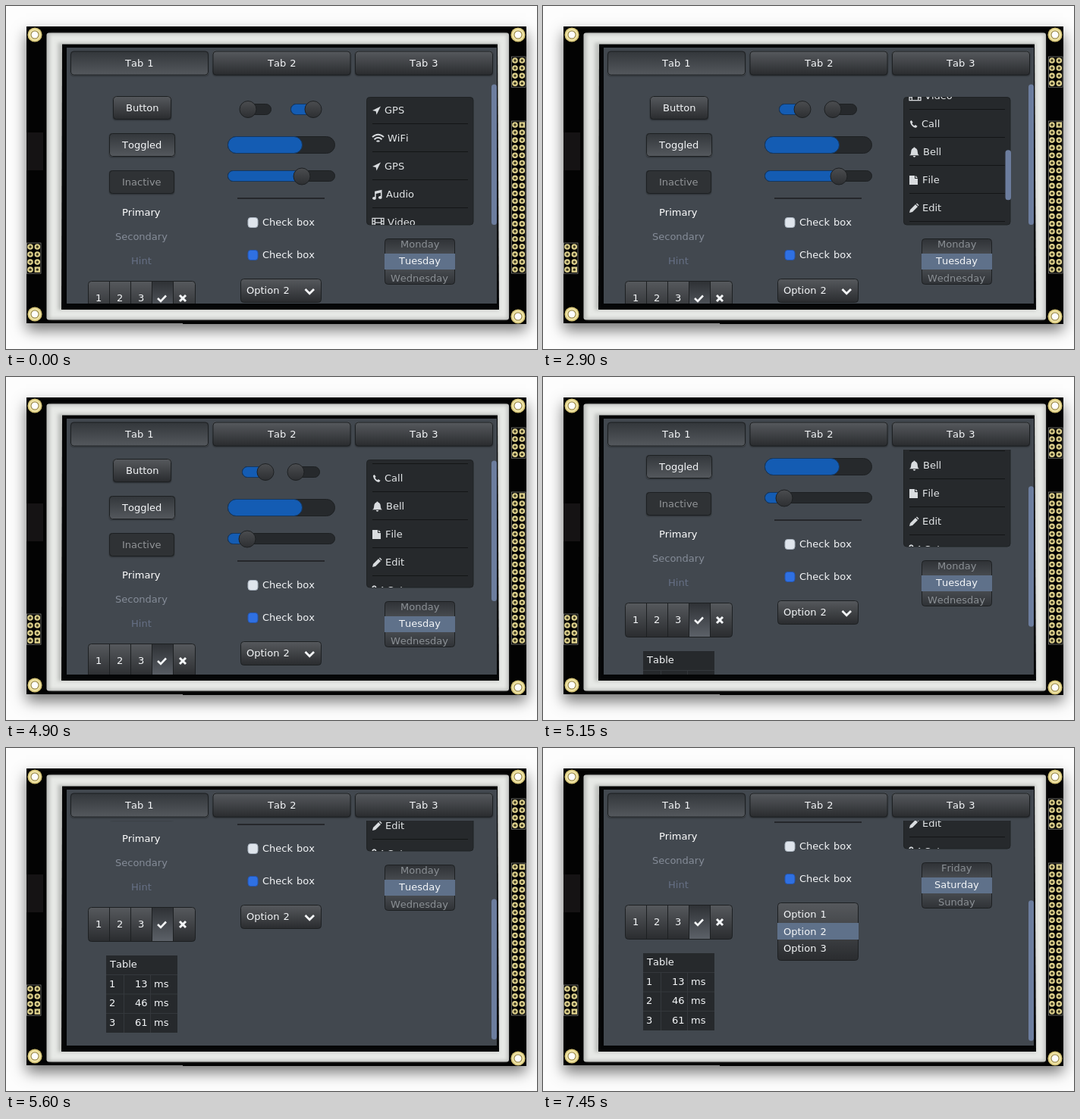
These frames come from a looping animation (700x453 px, 8000 ms). An HTML page with a canvas:

```html
<!DOCTYPE html>
<html lang="en">
<head>
<meta charset="utf-8">
<title>Display board demo</title>
<style>
html, body { margin: 0; width: 100%; height: 100%; overflow: hidden; background: #fdfdfd; }
canvas { display: block; }
</style>
</head>
<body>
<canvas id="stage" width="700" height="453"></canvas>
<script>
const c = document.getElementById('stage').getContext('2d');
const LOOP = 8000, STEP = 50;
const BLUE = '#145cb3', DARK = '#26292c', EDGE = '#1d2022', BAND = '#5f718a', THUMB = '#6c7d9e';
const RAISED = ['#56595d', '#2a2c2f'], SUNKEN = ['#33373b', '#54585d'];
const WHITE = '#f4f6f8', GREY = '#8b9095';

// Piecewise linear tracks: [time, value, time, value, ...]
const tracks = {
  switchA: [50, 319, 350, 342],
  switchB: [1100, 405, 1350, 382],
  list: [2100, 0, 2500, 90, 2800, 156, 2900, 167, 2950, 170, 3050, 175, 3200, 178],
  slider: [3850, 390, 4400, 318],
  page: [4850, 0, 4900, 11, 5400, 118, 5450, 129, 5500, 138, 5550, 147, 5600, 153, 5650, 156],
  roller: [6050, 0, 6250, 60, 6350, 80.5, 6450, 84, 6600, 84, 6850, 90],
  menu: [7300, 31, 7350, 54, 7450, 76]
};

function at(name, t) {
  const k = tracks[name];
  if (t <= k[0]) return k[1];
  for (let i = 2; i < k.length; i += 2) {
    if (t <= k[i]) return k[i - 1] + (k[i + 1] - k[i - 1]) * (t - k[i - 2]) / (k[i] - k[i - 2]);
  }
  return k[k.length - 1];
}

function gradient(y, h, colors) {
  const g = c.createLinearGradient(0, y, 0, y + h);
  colors.forEach((color, i) => g.addColorStop(i / (colors.length - 1), color));
  return g;
}

function box(x, y, w, h, r, fill, stroke) {
  c.beginPath();
  c.roundRect(x, y, w, h, r);
  c.fillStyle = Array.isArray(fill) ? gradient(y, h, fill) : fill;
  c.fill();
  if (stroke) {
    c.strokeStyle = stroke;
    c.lineWidth = 1;
    c.stroke();
  }
}

function rect(x, y, w, h, color) {
  c.fillStyle = color;
  c.fillRect(x, y, w, h);
}

function disc(x, y, r, color) {
  c.beginPath();
  c.arc(x, y, r, 0, 7);
  c.fillStyle = color;
  c.fill();
}

function clipped(x, y, w, h, r, draw) {
  c.save();
  c.beginPath();
  c.roundRect(x, y, w, h, r);
  c.clip();
  draw();
  c.restore();
}

// Text starts on whole pixels; align is the share of its width left of x.
function text(s, x, y, color = WHITE, align = .5) {
  c.font = '13px "DejaVu Sans", sans-serif';
  c.fontKerning = 'none';
  c.wordSpacing = '1px';
  c.fillStyle = color;
  c.fillText(s, Math.round(x - c.measureText(s).width * align), Math.round(y + 4.4));
}

function button(label, x, y, w, h, fill, color) {
  c.save();
  c.shadowColor = 'rgba(15,17,20,.5)';
  c.shadowBlur = 2;
  c.shadowOffsetY = 1;
  box(x, y, w, h, 4, fill);
  c.restore();
  box(x + .5, y + .5, w - 1, h - 1, 4, fill, EDGE);
  text(label, x + w / 2, y + h / 2, color);
}

// Icons sit in a 12 x 12 square centred on the origin; w is the shown width, s marks stroked ones.
const icons = {
  GPS: { w: 11, d: 'M6-6 0 6-1 1-6 0Z' },
  WiFi: { w: 15, d: 'M-6-1.5Q0-7 6-1.5M-4 1Q0-3 4 1M-1.5 3.2Q0 2 1.5 3.2', s: 1.6 },
  Audio: { w: 12.5, d: 'M-3-4 6-6V3.5A2.2 1.8 0 1 1 4.5 2V-2.5L-1.5-1V4.5A2.2 1.8 0 1 1-3 3Z' },
  Video: { w: 15, d: 'M-6-4.5H6V4.5H-6ZM-3.3-4.5V4.5M3.3-4.5V4.5M-3.3 0H3.3M-6-1.5H-3.3M-6 1.5H-3.3M3.3-1.5H6M3.3 1.5H6', s: 1 },
  Call: { w: 11, d: 'M-5-4-3-5.5-1-2.5-2.3-1Q-1 1.5 1.2 2.4L2.5 1 5.5 3 4 5Q2.5 6-1 3.5T-5-4Z' },
  Bell: { w: 13, d: 'M0-6Q1-6 1-5Q4-4 4 0Q4 3 6 4H-6Q-4 3-4 0Q-4-4-1-5Q-1-6 0-6ZM-1.6 4.7H1.6Q1.2 6.2 0 6.2T-1.6 4.7Z' },
  File: { w: 12, d: 'M-6-6H1V-2H5V6H-6ZM2-6 5-3H2Z' },
  Edit: { w: 12, d: 'M-6 6-5 2 2-5 5-2-2 5ZM2.8-5.8 4-6.5 6.5-4 5.8-2.8Z' },
  Cut: { w: 14, d: 'M-4-5A1.8 1.8 0 1 0-3.9-5M-4 1.5A1.8 1.8 0 1 0-3.9 1.5M-2-2 6 4M-2 2 6-4', s: 1.5 }
};

function listItem(name, y) {
  const { w, d, s } = icons[name], p = new Path2D(d);
  c.save();
  c.translate(483 + w / 2, y + .5);
  c.scale(w / 12, w / 12);
  c.fillStyle = c.strokeStyle = '#d9dcdf';
  c.lineWidth = s;
  s ? c.stroke(p) : c.fill(p);
  c.restore();
  text(name, 488 + w, y, '#e3e6e8', 0);
  line('#131516', 1, 483, y + 18, 609, y + 18);
}

function line(color, width, ...pts) {
  c.beginPath();
  for (let i = 0; i < pts.length; i += 2) c.lineTo(pts[i], pts[i + 1]);
  c.strokeStyle = color;
  c.lineWidth = width;
  c.stroke();
}

function pins(x, y, rows, squareX, squareY) {
  c.strokeStyle = '#8f8f88';
  c.lineWidth = .7;
  c.strokeRect(x - 4.5, y - 5, 18.5, rows * 10.05);
  for (let i = 0; i < rows * 2; i++) {
    const px = x + i % 2 * 9.3, py = y + (i >> 1) * 10.05;
    const square = i % 2 === squareX && i >> 1 === squareY;
    if (square) rect(px - 3.7, py - 3.7, 7.4, 7.4, '#ddd08c');
    else disc(px, py, 3.8, '#ddd08c');
    disc(px, py, 1.7, '#37321c');
  }
}

function board() {
  rect(0, 0, 700, 453, '#fdfdfd');
  c.save();
  c.shadowColor = 'rgba(0,0,0,.55)';
  c.shadowBlur = 18;
  c.shadowOffsetY = 9;
  rect(27, 27, 659, 392, '#030303');
  c.restore();
  rect(233, 419, 453, 1, '#030303');
  rect(27, 167, 22, 50, '#151314');
  for (const [x, y] of [[38, 38], [675, 38], [38, 407], [675, 410]]) {
    disc(x, y, 9.6, '#d3c274');
    disc(x, y, 8, '#efe3a6');
    disc(x, y, 5.5, '#8d7c3a');
    disc(x, y, 4.5, '#fdfdfd');
  }
  pins(671, 72, 4, -1, 0);
  pins(671, 157, 20, 1, 0);
  pins(32, 318, 4, 1, 3);
  box(53.5, 35.5, 609.5, 379, 3, '#bfc1be');
  c.save();
  c.filter = 'blur(2px)';
  c.strokeStyle = '#e6e8e5';
  c.lineWidth = 11;
  c.strokeRect(63, 43, 592, 364);
  c.restore();
  c.beginPath();
  c.moveTo(74, 50.5);
  c.lineTo(648, 50.5);
  c.lineTo(650, 401);
  c.lineTo(73, 401);
  c.fillStyle = '#050607';
  c.fill();
  rect(80, 55, 567, 338, '#42484f');
}

function knob(x, y) {
  box(x - 11, y - 11, 22, 22, 11, ['#4b4d50', '#2d2f32'], EDGE);
}

function bar(x, y, w, h, filled) {
  box(x + .5, y + .5, w - 1, h - 1, h / 2, DARK, EDGE);
  if (filled > 0) box(x + .5, y + .5, filled, h - 1, h / 2, BLUE, '#15375f');
}

function toggle(x, knobX, on) {
  bar(x, 129, 39, 15, on ? knobX - x : 0);
  knob(knobX, 136.5);
}

function checkBox(y, fill, edge) {
  box(319, y - 6.5, 13, 13, 3.5, fill, edge);
  text('Check box', 338, y, WHITE, 0);
}

function keys() {
  box(108.5, 363.5, 141, 45, 4, RAISED, EDGE);
  rect(193, 364, 27, 44, gradient(364, 44, ['#2f3236', '#5c6168']));
  for (const x of [136.5, 164.5, 192.5, 220.5]) line(EDGE, 1, x, 364, x, 408);
  [122.5, 150, 178].forEach((x, i) => text(i + 1, x, 385.5));
  line(WHITE, 2.6, 200, 386, 204, 390, 211, 382.5);
  line(WHITE, 3, 229, 382, 237, 390);
  line(WHITE, 3, 237, 382, 229, 390);
}

function table() {
  rect(132, 427, 94, 102, DARK);
  for (let i = 1; i < 4; i++) line('#34383c', 1, 132, 427 + i * 25.5, 226, 427 + i * 25.5);
  line('#34383c', 1, 155.5, 452, 155.5, 529);
  line('#34383c', 1, 190.5, 452, 190.5, 529);
  text('Table', 137, 439, WHITE, 0);
  [13, 46, 61].forEach((ms, i) => {
    const y = 464.5 + i * 25.5;
    text(i + 1, 136, y, WHITE, 0);
    text(ms, 187, y, WHITE, 1);
    text('ms', 195, y, WHITE, 0);
  });
}

const items = ['GPS', 'WiFi', 'GPS', 'Audio', 'Video', 'Call', 'Bell', 'File', 'Edit', 'Cut'];

function list(t) {
  const scroll = Math.round(at('list', t));
  box(475.5, 120.5, 140.5, 168.5, 4, DARK, '#1f2224');
  clipped(475, 120, 142, 169, 4, () => {
    items.forEach((name, i) => {
      const y = 137.5 + i * 37 - scroll;
      if (i === 3 && t >= 2000 && t < 2150) rect(475, y - 18, 142, 37, gradient(y - 18, 37, ['#1f2123', '#3d4043']));
      listItem(name, y);
    });
  });
  if (t >= 2150 && t < 3200) box(609.5, 120 + scroll * .42, 7.5, 66, 3.5, THUMB);
}

const days = ['Monday', 'Tuesday', 'Wednesday', 'Thursday', 'Friday', 'Saturday', 'Sunday'];

function roller(t) {
  const scroll = at('roller', t);
  const names = color => days.forEach((day, i) => text(day, 545.5, 337 + (i - 1) * 22.5 - scroll, color));
  box(499.5, 307.5, 92, 60, 4, ['#2f3236', '#53575c', '#2f3236'], EDGE);
  clipped(500, 308, 92, 59, 3, () => names(GREY));
  clipped(499, 327, 93, 21, 0, () => {
    rect(499, 327, 93, 21, BAND);
    names(WHITE);
  });
}

function dropdown(t) {
  const h = at('menu', t);
  box(309.5, 360.5, 106, h, 4, RAISED, EDGE);
  if (t < 7350) {
    text('Option 2', 317, 375.5, WHITE, 0);
    line(WHITE, 2.8, 394.5, 374, 400.2, 379.7, 406, 374);
    return;
  }
  clipped(309, 361, 107, h - 1, 3, () => {
    rect(309, 387, 107, 22, BAND);
    for (let i = 0; i < 3; i++) text('Option ' + (i + 1), 317, 375.5 + i * 22.7, WHITE, 0);
  });
}

function page(t) {
  button('Button', 141, 119, 77, 31, RAISED);
  button('Toggled', 136, 168, 87, 31, SUNKEN);
  button('Inactive', 136, 217, 86, 31, '#2f3235', '#919497');
  text('Primary', 178.5, 273, '#ffffff');
  text('Secondary', 178.5, 305, '#858c98');
  text('Hint', 178.5, 337, '#667085');
  keys();
  table();
  toggle(311, at('switchA', t), t >= 350);
  toggle(375, at('switchB', t), t < 1350);
  bar(292, 172, 142, 23, 98);
  bar(292, 217, 142, 15, at('slider', t) - 292);
  knob(at('slider', t), 225);
  line('#1b1d1f', 1.5, 305, 254, 420, 254);
  checkBox(286, '#dfe5ec', '#aab4c0');
  checkBox(329, '#2f70e2', '#2355b0');
  list(t);
  roller(t);
  dropdown(t);
}

function draw(t) {
  board();
  for (let i = 0; i < 3; i++) {
    button('Tab ' + (i + 1), 85 + i * 187.5, 59.5, 182, 32, i ? RAISED : SUNKEN);
  }
  const scroll = Math.round(at('page', t));
  clipped(80, 96, 567, 297, 0, () => {
    c.translate(0, -scroll);
    page(t);
  });
  box(640, 103.5 + scroll * .627, 7, 185.5, 3.5, THUMB);
}

function frame(now) {
  draw(Math.floor(now % LOOP / STEP) * STEP);
  requestAnimationFrame(frame);
}
requestAnimationFrame(frame);
</script>
</body>
</html>
```
